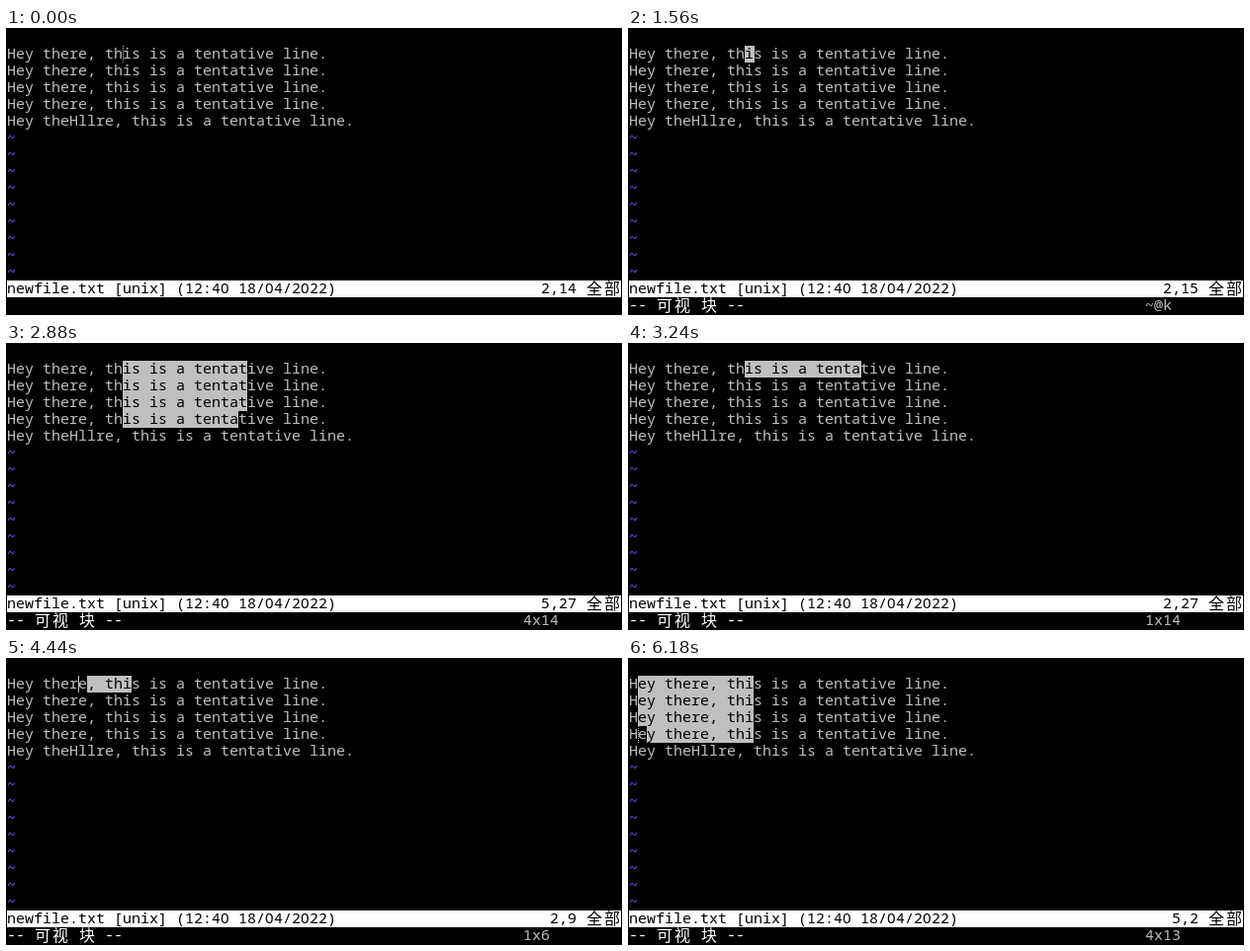
An HTML page that plays this animation: 623x291 px, repeating every 6300 ms.

```html
<!DOCTYPE html>
<html lang="zh">
<head>
<meta charset="utf-8">
<title>Vim block selection</title>
<style>
  html, body { margin: 0; width: 623px; height: 291px; overflow: hidden; background: #000; }
  svg { display: block; }
  text { font: 15px "Noto Sans Mono", "DejaVu Sans Mono", monospace; white-space: pre; }
  .zero { font-family: "Noto Sans", "Open Sans", sans-serif; }
  .wide { font: 16px "Noto Sans CJK SC", "Noto Sans CJK", sans-serif; }
</style>
</head>
<body>
<svg id="screen" width="623" height="291" viewBox="0 0 623 291">
  <defs><clipPath id="selected"><path id="clipShape"/></clipPath></defs>
  <rect width="623" height="291" fill="#000"/>
  <g id="lines" fill="#bfbfbf"></g>
  <g id="tildes" fill="#6060ff"></g>
  <path id="highlight" fill="#bfbfbf" shape-rendering="crispEdges"/>
  <g id="selectedLines" fill="#000" clip-path="url(#selected)"></g>
  <path id="cursor" stroke="#bfbfbf" shape-rendering="crispEdges"/>
  <rect x="1" y="256" width="621" height="17" fill="#fff"/>
  <g id="statusLine" fill="#000"></g>
  <g id="mode" fill="#fff"></g>
  <g id="command" fill="#bfbfbf"></g>
</svg>
<script>
(() => {
  const LOOP = 6300, TICK = 60, CELL_W = 9, CELL_H = 17;
  const STATUS_ROW = 16, MESSAGE_ROW = 17;
  const ANCHOR = 14, FIRST_ROW = 2;
  const VISUAL_START = 780, FOCUS_IN = 240, FOCUS_OUT = 6180;

  // [time, row, column, glide]: with glide the column runs evenly to the next entry
  const moves = [
    [0, 2, 14], [1080, 2, 15], [1560, 2, 15, true], [2040, 2, 27],
    [2100, 3, 27], [2220, 4, 27], [2400, 5, 27],
    [2940, 4, 27], [3120, 3, 27], [3240, 2, 27],
    [3420, 2, 26], [3900, 2, 25, true], [4440, 2, 9],
    [4500, 2, 8, true], [4680, 2, 2],
    [4740, 3, 2], [4920, 4, 2], [5100, 5, 2]
  ];
  const pendingKeys = [[1080, 1140], [1560, 2100], [2220, 2280]];
  const cursorOff = [[2880, 2940], [5580, 6120]];

  const byId = id => document.getElementById(id);
  const cellX = col => 1 + (col - 1) * CELL_W;
  const cellY = row => 1 + (row - 1) * CELL_H;
  const within = (ranges, t) => ranges.some(([from, to]) => t >= from && t < to);

  function setText(el, col, content) {
    el.setAttribute("x", Array.from(content, (_, i) => cellX(col + i)).join(" "));
    el.innerHTML = content.replace(/0/g, '<tspan class="zero">0</tspan>');
  }

  function addText(group, row, col = 1, content = "") {
    const el = document.createElementNS("http://www.w3.org/2000/svg", "text");
    byId(group).append(el);
    el.setAttribute("y", cellY(row) + 13);
    setText(el, col, content);
    return el;
  }

  function addWide(group, row, col, content) {
    [...content].forEach((char, i) => {
      const el = addText(group, row, col + 2 * i, char);
      el.setAttribute("class", "wide");
      el.setAttribute("x", cellX(col + 2 * i) + 1);
      el.setAttribute("y", cellY(row) + 14);
    });
  }

  for (let row = 2; row <= 5; row++) {
    for (const group of ["lines", "selectedLines"]) {
      addText(group, row, 1, "Hey there, this is a tentative line.");
    }
  }
  addText("lines", 6, 1, "Hey theHllre, this is a tentative line.");
  for (let row = 7; row <= 15; row++) addText("tildes", row, 1, "~");

  addText("statusLine", STATUS_ROW, 1, "newfile.txt [unix] (12:40 18/04/2022)");
  addWide("statusLine", STATUS_ROW, 66, "全部");
  const ruler = addText("statusLine", STATUS_ROW);

  addText("mode", MESSAGE_ROW, 1, "--");
  addWide("mode", MESSAGE_ROW, 4, "可视");
  addWide("mode", MESSAGE_ROW, 9, "块");
  addText("mode", MESSAGE_ROW, 12, "--");
  const command = addText("command", MESSAGE_ROW);

  function positionAt(t) {
    const i = moves.findLastIndex(move => move[0] <= t);
    const [start, row, col, glide] = moves[i];
    if (!glide) return { row, col };
    const [end, , target] = moves[i + 1];
    return { row, col: col + Math.round((target - col) * (t - start) / (end - start)) };
  }

  // The cell under the cursor itself stays unselected.
  function selectionPath(row, col) {
    let path = "";
    for (let r = FIRST_ROW; r <= row; r++) {
      let from = Math.min(ANCHOR, col), to = Math.max(ANCHOR, col);
      if (r === row) {
        if (col > ANCHOR) to--;
        else from++;
      }
      if (from <= to) {
        path += `M${cellX(from)} ${cellY(r)}H${cellX(to + 1)}v${CELL_H}H${cellX(from)}z`;
      }
    }
    return path;
  }

  function render(time) {
    const t = Math.floor(time % LOOP / TICK) * TICK;
    const { row, col } = positionAt(t);
    const visual = t >= VISUAL_START;
    const focused = t >= FOCUS_IN && t < FOCUS_OUT;

    const path = visual ? selectionPath(row, col) : "";
    byId("highlight").setAttribute("d", path);
    byId("clipShape").setAttribute("d", path);

    const cursor = byId("cursor");
    cursor.setAttribute("d", `M${cellX(col) + 0.5} ${cellY(row)}v${CELL_H}`);
    cursor.setAttribute("stroke-dasharray", focused ? "none" : "1 1");
    cursor.setAttribute("visibility", within(cursorOff, t) ? "hidden" : "visible");

    const place = `${row},${col}`;
    setText(ruler, 65 - place.length, place);

    const size = `${row - FIRST_ROW + 1}x${Math.abs(col - ANCHOR) + 1}`;
    setText(command, 59, visual ? (within(pendingKeys, t) ? "~@k" : size) : "");
    byId("mode").setAttribute("visibility", visual ? "visible" : "hidden");
  }

  const began = performance.now();
  function loop() {
    render(performance.now() - began);
    requestAnimationFrame(loop);
  }
  loop();
})();
</script>
</body>
</html>
```
